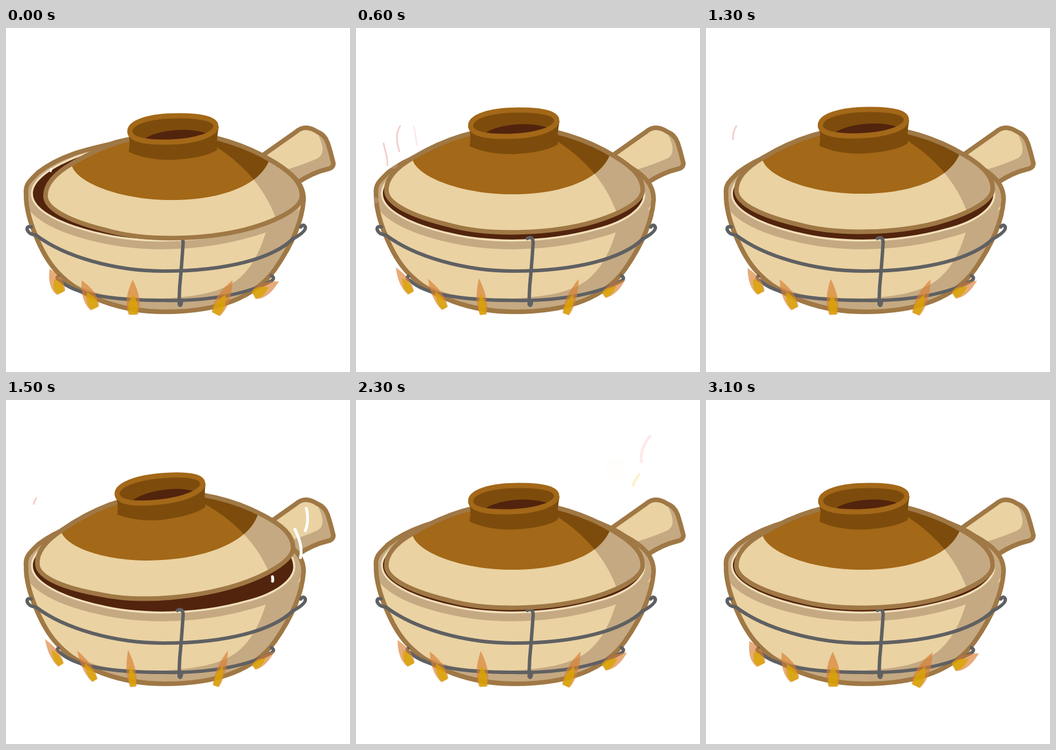
An HTML page with a canvas for the animation above (3200 ms loop, 600 by 600 pixels).

```html
<!DOCTYPE html>
<html lang="en">
<head>
<meta charset="utf-8">
<title>Clay pot</title>
<style>
html, body { margin: 0; width: 100%; height: 100%; overflow: hidden; background: #fff; }
canvas { display: block; width: 100vmin; height: 100vmin; }
</style>
</head>
<body>
<canvas id="stage" width="600" height="600"></canvas>
<script>
const ctx = document.getElementById('stage').getContext('2d');
const LOOP = 3200, STEP = 100;
const CLAY = '#ead2a2', SHADE = '#c5a982', EDGE = '#9f7845', LIP = '#f1dfba';
const GLAZE = '#a36818', GLAZE_DARK = '#7d4c0c', INSIDE = '#52240d', WIRE = '#5f6062';

const path = d => new Path2D(d);
const lerp = (a, b, k) => a + (b - a) * k;
const ramp = (t, a, b) => Math.min(1, Math.max(0, (t - a) / (b - a)));

function smooth(t, a, b) {
  const k = ramp(t, a, b);
  return k * k * (3 - 2 * k);
}

// Rises from 0 to 1 at the middle and back.
const bump = (t, mid, half) => Math.sin(Math.PI * ramp(t, mid - half, mid + half)) ** 2;

function fill(p, color) { ctx.fillStyle = color; ctx.fill(p); }

function stroke(p, color, width) {
  ctx.strokeStyle = color;
  ctx.lineWidth = width;
  ctx.stroke(p);
}

function scoped(draw) {
  ctx.save();
  draw();
  ctx.restore();
}

const clipped = (p, draw) => scoped(() => { ctx.clip(p); draw(); });

const handle = {
  body: path('M445 224L506 181Q522 167 543 181Q556 186 561 200Q566 215 571 236Q571 244 561 246Q535 252 508 270Z'),
  shade: path('M540 178Q562 216 544 227Q520 238 480 250L510 275L575 245V180Z')
};

const pot = {
  body: path('M35 290C33 272 42 266 56 252C95 222 140 212 180 203C260 175 400 190 470 238C500 254 520 272 519 300C516 345 492 388 469 421C434 470 370 495 277 495C200 495 130 470 89 425C62 396 34 330 35 290Z'),
  shade: path('M455 350C445 385 430 420 400 442C370 462 330 470 250 473C190 475 140 462 95 432V510H540V300Z'),
  hole: path('M47 290C46 270 70 250 110 232C200 190 400 190 450 230C480 250 502 270 501 292C500 312 472 336 420 349C340 372 240 376 160 356C100 342 48 318 47 290Z')
};

const wires = [
  'M44 347Q36 345 37 352Q40 360 52 361C102 399 190 424 275 424C385 424 465 402 500 368Q524 355 522 347Q519 341 514 347',
  'M91 433Q86 437 95 441C126 470 210 475 275 475C365 477 430 460 463 441Q470 436 463 432',
  'M299 367Q308 362 309 374Q306 420 303 450Q302 470 302 482Q305 487 306 478'
].map(path);

const lid = {
  body: path('M53 290C52 268 72 248 100 232C140 208 198 181 275 180C340 177 408 203 450 229C485 250 501 268 500 290C498 313 450 335 400 348C330 365 230 369 160 349C102 335 54 314 53 290Z'),
  glaze: path('M99 237C110 268 190 297 275 296C350 296 422 275 442 229L450 170H99Z'),
  shade: path('M350 203C390 228 435 270 456 332L520 350V160H350Z'),
  neck: path('M196 176Q202 192 198 212Q230 227 275 226Q330 223 352 209Q351 190 355 168Z'),
  ring: path('M200 178C198 160 235 149 285 149C330 149 351 156 350 168C349 182 315 194 268 195C225 196 202 190 200 178Z'),
  hole: path('M220 198A62 21 -4 0 1 344 192Z')
};

// base and tip
const flames = [
  [96, 462, 76, 420], [155, 489, 132, 440], [222, 500, 221, 439],
  [366, 499, 395, 440], [432, 466, 476, 442]
];

// start, end, bend, begin, life
const PINK = '#f5cfcc', PALE = '#fdeaea', YELLOW = '#fdf2d0';
const wisps = [
  [114, 239, 93, 147, -5, 200, 850, PALE],
  [78, 250, 77, 171, 14, -30, 1200, PINK],
  [53, 247, 53, 171, 14, 270, 1390, PINK],
  [522, 228, 513, 63, 42, 1370, 1210, PALE],
  [512, 280, 494, 130, 40, 1300, 1120, YELLOW],
  [465, 316, 439, 231, 20, 1450, 800, PALE]
];

// place and time when fullest, size
const puffs = [
  [34, 278, 900, 7], [65, 215, 900, 10],
  [552, 189, 1900, 13], [509, 279, 1900, 13], [452, 120, 2300, 18]
];

function drawHandle() {
  fill(handle.body, CLAY);
  clipped(handle.body, () => fill(handle.shade, SHADE));
  stroke(handle.body, EDGE, 8);
}

function drawPot() {
  fill(pot.body, CLAY);
  clipped(pot.body, () => {
    fill(pot.shade, SHADE);
    stroke(pot.hole, SHADE, 34);
    stroke(pot.hole, LIP, 7);
  });
  fill(pot.hole, INSIDE);
  stroke(pot.body, EDGE, 8);
  wires.forEach(w => stroke(w, WIRE, 6));
}

function moveLid(t) {
  const slide = 1 - ramp(t, 0, 300);
  const simmer = smooth(t, 0, 600) - smooth(t, 1750, 2000);
  const hop = bump(t, 1570, 330);
  ctx.translate(275 + 16 * slide, 270 + 4 * slide - 6 * simmer - 12.5 * hop);
  ctx.rotate((1.8 * bump(t, 300, 300) - 4.3 * hop) * Math.PI / 180);
  ctx.translate(-275, -270);
}

function drawLid() {
  fill(lid.body, CLAY);
  clipped(lid.body, () => {
    fill(lid.shade, SHADE);
    fill(lid.glaze, GLAZE);
    clipped(lid.glaze, () => fill(lid.shade, GLAZE_DARK));
  });
  stroke(lid.body, EDGE, 8);
  fill(lid.neck, GLAZE_DARK);
  fill(lid.ring, GLAZE_DARK);
  clipped(lid.ring, () => fill(lid.hole, INSIDE));
  stroke(lid.ring, GLAZE, 9);
}

// A leaf that points along x from a blunt base.
function leaf(length, width, color) {
  ctx.fillStyle = color;
  ctx.beginPath();
  ctx.moveTo(0, -width * .5);
  ctx.bezierCurveTo(length * .35, -width, length * .7, -width * .55, length, 0);
  ctx.bezierCurveTo(length * .7, width * .55, length * .35, width, 0, width * .5);
  ctx.fill();
}

function drawFlame([x, y, tipX, tipY], t) {
  const sway = Math.sin(Math.PI * t / 1000) ** 4;
  const dx = tipX - 8 * sway - x, dy = tipY - 3 * sway - y;
  const length = Math.hypot(dx, dy), width = 16 * (1 - .3 * sway);
  scoped(() => {
    ctx.translate(x, y);
    ctx.rotate(Math.atan2(dy, dx));
    leaf(length, width, 'rgba(218,127,50,.65)');
    leaf(length * .58, width * .75, 'rgba(216,165,0,.8)');
  });
}

function drawWisp([x0, y0, x1, y1, bend, begin, life, tint], t) {
  const head = ramp(t, begin, begin + 550);
  const tail = ramp(t, begin + .15 * life, begin + life);
  if (head <= tail) return;
  ctx.beginPath();
  for (let i = 0; i <= 24; i++) {
    const k = lerp(tail, head, i / 24), n = 1 - k;
    const swing = 1.8 * bend * n * k * (n - 2 * k);
    ctx.lineTo(lerp(x0, x1, k) + swing, lerp(y0, y1, k));
  }
  ctx.strokeStyle = head < .5 ? '#fff' : tint;
  ctx.lineWidth = x0 < 300 ? 3 : 5;
  ctx.stroke();
}

function drawPuff([x, y, peak, size], t) {
  const k = (t - peak) / 400;
  if (Math.abs(k) >= 1) return;
  ctx.fillStyle = `rgba(254,252,247,${.4 * (1 - k * k)})`;
  ctx.beginPath();
  ctx.arc(x, y - 30 * k, size * (1 + .3 * k), 0, Math.PI * 2);
  ctx.fill();
}

function draw(t) {
  ctx.fillStyle = '#fff';
  ctx.fillRect(0, 0, 600, 600);
  ctx.lineCap = ctx.lineJoin = 'round';
  drawHandle();
  drawPot();
  scoped(() => { moveLid(t); drawLid(); });
  flames.forEach(f => drawFlame(f, t));
  puffs.forEach(p => drawPuff(p, t));
  wisps.forEach(w => drawWisp(w, t));
}

const start = performance.now();
function tick() {
  const t = (performance.now() - start) % LOOP;
  draw(Math.floor(t / STEP) * STEP);
  requestAnimationFrame(tick);
}
tick();
</script>
</body>
</html>
```
